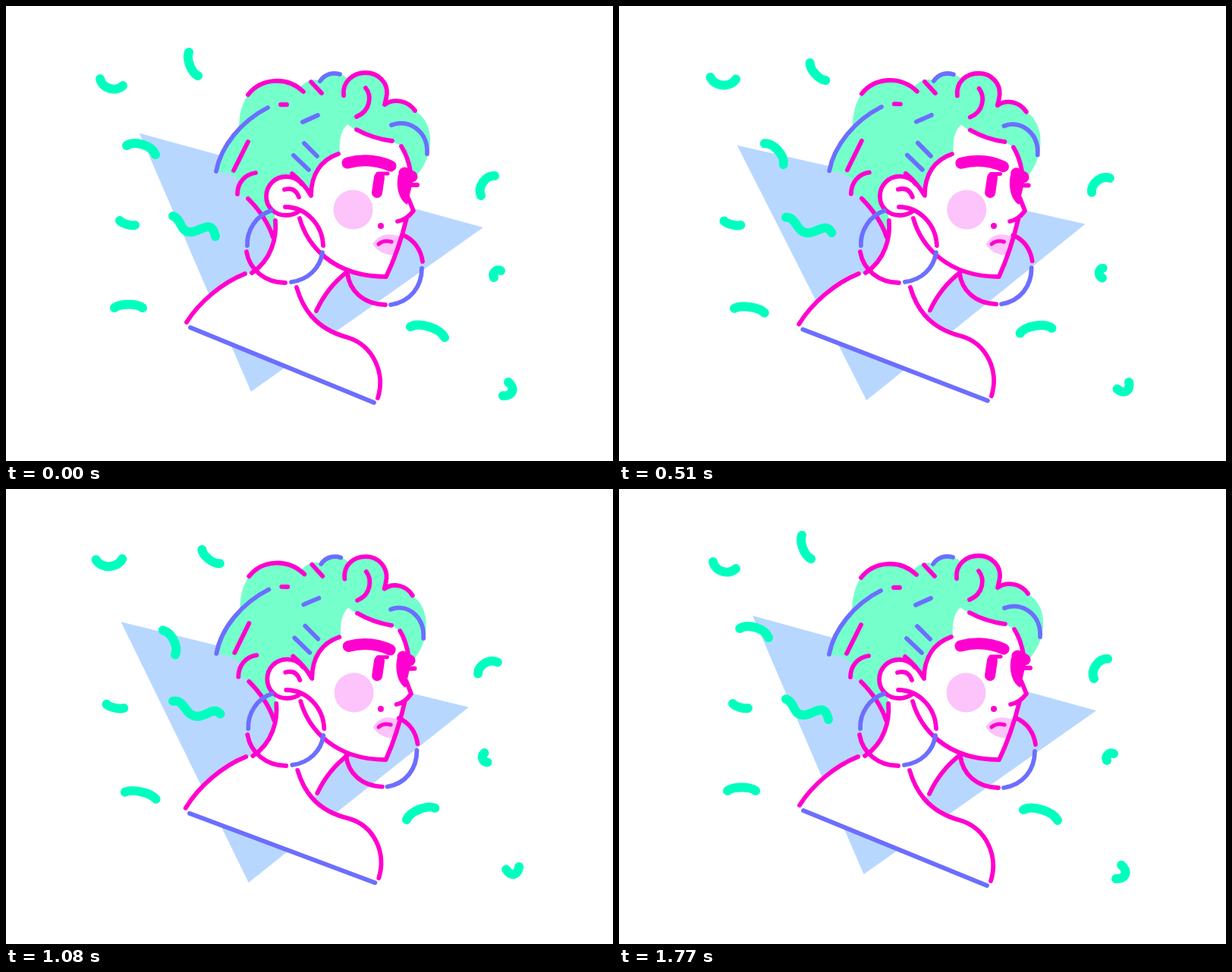
These frames come from a looping animation (800x600 px, 1.8 s). An HTML page with a canvas:

```html
<!DOCTYPE html>
<html lang="en">
<head>
<meta charset="utf-8">
<title>Portrait with confetti</title>
<style>
  html, body { margin: 0; width: 100%; height: 100%; overflow: hidden; background: #fff; }
  canvas { display: block; }
</style>
</head>
<body>
<canvas id="stage" width="800" height="600"></canvas>
<script>
const ctx = document.getElementById('stage').getContext('2d');
const LOOP = 1800, STEP = 30;
const PINK = '#ff00cf', BLUE = '#6c6eff', MINT = '#75ffcb',
      CONFETTI = '#00ffbf', SKY = '#b8d7ff', BLUSH = '#fcc4fa';

const clamp = (v, lo = 0, hi = 1) => Math.min(hi, Math.max(lo, v));
const mix = (a, b, p) => a + (b - a) * p;

// Confetti arcs: first chord, last chord, bend
const ARCS = [
  [124, 96, 154, 105, 118, 93, 153, 91, .55],
  [241, 61, 253, 92, 260, 81, 284, 98, .3],
  [159, 184, 197, 196, 210, 188, 224, 221, -.38],
  [150, 283, 170, 289, 131, 284, 154, 289, .2],
  [143, 398, 180, 398, 158, 400, 199, 410, -.24],
  [644, 224, 626, 250, 648, 229, 622, 243, .5],
  [652, 349, 643, 358, 629, 349, 634, 361, .7],
  [533, 423, 578, 437, 528, 437, 564, 420, -.31],
  [662, 496, 655, 514, 677, 499, 660, 501, -.95]
];
const SQUIGGLE = [
  [220, 277, 232, 281, 229, 299, 244, 298, 257, 297, 271, 280, 276, 304],
  [220, 280, 236, 276, 236, 300, 253, 300, 265, 300, 274, 287, 283, 296]
];

const BODY = `M238,417 C255,390 285,365 315,353 L324,352 C350,335 357,305 355,283
  L350,250 L402,200 L440,195 C439,180 440,165 450,156 L515,176 L521,185
  C528,196 531,206 533,218 L531,254 L537,270 L527,280 L501,357 L449,351
  C435,362 420,378 409,402 L402,408 C412,420 427,431 450,437
  C485,448 500,485 490,517 L485,523 L243,424 Z`;

const HAIR = `M277,218 C282,192 294,175 307,161 C307,143 311,128 319,117
  C336,95 370,92 388,107 C396,98 406,95 414,99 C420,90 430,87 440,90
  Q448,92 452,98 C458,91 465,88 474,88 C492,88 503,102 502,116 L499,130
  C512,121 530,125 539,138 C553,147 560,162 559,180 C558,198 551,212 541,224
  L533,218 C531,206 528,196 521,185 L509,178 Q472,174 450,156
  C440,165 439,180 440,195 C415,203 402,222 402,250 L385,232 L350,245
  L355,283 L352,305 Q343,278 319,254 L306,247 L307,231 Q299,221 288,220 Z`;

const HAIR_PINK = `M319,117 C336,95 370,92 392,113 M402,100 L416,115 M362,130 L370,130
  M445,118 C443,100 457,88 474,88 C492,88 503,102 502,116 Q501,123 499,130
  C512,121 530,125 539,138 M474,108 C482,118 481,138 462,146
  M462,163 Q484,175 509,178 M319,179 L300,217 M305,248 C305,233 315,222 329,220
  M438,195 C415,203 402,222 402,250 Q392,233 377,221 M319,254 Q343,278 352,305`;

const HAIR_BLUE = `M277,218 C283,185 310,152 345,134 M414,99 C420,90 430,87 440,90
  M508,157 C530,148 557,165 555,195 M391,153 L411,144
  M393,181 L410,198 M379,197 L399,216`;

const BODY_PINK = `M238,417 C255,390 285,365 315,353 M355,283 C357,305 350,335 324,352
  M383,371 C390,395 405,425 450,437 C485,448 500,485 490,517
  M449,351 C435,362 420,378 409,402
  M387,280 C397,315 430,357 501,357 C513,332 523,300 528,280
  M521,185 C528,196 531,206 533,218 M530,253 L537,270 Q528,282 516,284`;

const EAR = 'M390,235 C385,228 378,225 369,225 C354,225 343,237 343,251 C343,265 354,276 369,276 C376,276 382,274 387,270';
const EAR_INNER = 'M367,242 Q381,238 386,252';
const HOOP_PINK = 'M368,265 C395,265 417,288 418,316 M317,324 C321,348 342,365 368,365';
const HOOP_BLUE = 'M318,316 C317,296 330,276 349,270 M376,364 C398,361 414,346 417,325';
const FAR_HOOP_PINK = 'M523,302 C538,308 547,322 549,337 M500,394 C470,393 453,375 450,353';
const FAR_HOOP_BLUE = 'M548,346 C548,370 533,390 507,394';
const LIPS = 'M483,314 C491,302 502,298 519,304 L512,329 C499,328 490,324 483,314 Z';
const FAR_EYE = 'M517,222 C513,240 519,257 529,262 L536,232 Z';

// Slight turn of the head and sway of the shoulders
function turn(x, y, p) {
  const low = clamp((y - 360) / 60);
  const side = Math.max(0, x - 440) ** 2 * .0005 * (1 - low);
  const back = Math.max(0, 300 - x) * .045;
  const nod = clamp((x - 420) * .022, -2, 2.6) * clamp((260 - y) / 80);
  const sway = (364 - x) / 30 * low;
  return [x + p * (1.4 - side - back), y + p * (nod + sway)];
}

const swing = (x, y, p) => [x - p * (2 + (x - 450) * .051), y - p * clamp((y - 310) / 40, -.5, 1) * 1.5];

const bend = (d, p, warp = turn) => new Path2D(
  d.replace(/([\d.]+),([\d.]+)/g, (_, x, y) => warp(+x, +y, p).join(',')));

function fill(path, color) {
  ctx.fillStyle = color;
  ctx.fill(path);
}

function line(path, color, width = 5.8) {
  ctx.strokeStyle = color;
  ctx.lineWidth = width;
  ctx.stroke(path);
}

function dot(x, y, r, color, p) {
  const path = new Path2D();
  path.arc(...turn(x, y, p), r, 0, Math.PI * 2);
  fill(path, color);
}

// Turns and scales the chord about the fixed point of its two poses
function arc([x1, y1, x2, y2, u1, v1, u2, v2, k], p) {
  const dx = x2 - x1, dy = y2 - y1, ex = u2 - u1, ey = v2 - v1, n = dx * dx + dy * dy;
  const wr = (ex * dx + ey * dy) / n, wi = (ey * dx - ex * dy) / n;
  const ar = 1 - wr, ai = -wi, m = ar * ar + ai * ai;
  const br = u1 - (wr * x1 - wi * y1), bi = v1 - (wr * y1 + wi * x1);
  const cx = (br * ar + bi * ai) / m, cy = (bi * ar - br * ai) / m;
  const s = Math.hypot(wr, wi) ** p, a = Math.atan2(wi, wr) * p;
  const c = Math.cos(a) * s, d = Math.sin(a) * s;
  const at = (along, off) => {
    const x = x1 + dx * along - dy * off - cx, y = y1 + dy * along + dx * off - cy;
    return [cx + x * c - y * d, cy + x * d + y * c];
  };
  const path = new Path2D(), h = k * .667;
  path.moveTo(...at(0, 0));
  path.bezierCurveTo(...at(.2, h), ...at(.8, h), ...at(1, 0));
  line(path, CONFETTI, 12);
}

function squiggle(p) {
  const q = SQUIGGLE[0].map((v, i) => mix(v, SQUIGGLE[1][i], p));
  const path = new Path2D();
  path.moveTo(q[0], q[1]);
  path.bezierCurveTo(...q.slice(2, 8));
  path.bezierCurveTo(...q.slice(8));
  line(path, CONFETTI, 12);
}

function triangle(angle, ease) {
  const s = Math.sin(angle - 1.117), tilt = Math.sin(angle - .698), shift = 17.1 * ease;
  const path = new Path2D();
  path.moveTo(170 - 6.5 * s - shift, 174.5 + 10.5 * tilt);
  path.lineTo(626.5 - 2.7 * s - shift, 289.3 - 3.1 * s);
  path.lineTo(331 + 9 * s - shift, 515.3 + 7.7 * s);
  path.closePath();
  fill(path, SKY);
}

function portrait(p) {
  fill(bend(BODY, p), '#fff');
  fill(bend(HAIR, p), MINT);
  fill(bend(EAR, p), '#fff');
  dot(457.5, 268.5, 26, BLUSH, p);
  fill(bend(LIPS, p), BLUSH);

  line(bend(FAR_HOOP_PINK, p, swing), PINK);
  line(bend(FAR_HOOP_BLUE, p, swing), BLUE);
  line(bend(HAIR_BLUE, p), BLUE);
  line(bend(HAIR_PINK, p), PINK);
  line(bend(BODY_PINK, p), PINK);
  line(bend('M243,424 L485,523', p), BLUE);
  line(bend(EAR, p), PINK);
  line(bend(EAR_INNER, p), PINK);
  line(bend(HOOP_BLUE, p), BLUE);
  line(bend(HOOP_PINK, p), PINK);

  line(bend('M450,207 Q480,199 507,211', p), PINK, 15);
  line(bend('M492,226 L489,246', p), PINK, 14);
  line(bend('M490,221 L503,221', p), PINK, 5);
  line(bend('M525,220 L535,225', p), PINK, 15);
  fill(bend(FAR_EYE, p), PINK);
  line(bend('M533,236 L542,236', p), PINK, 6);
  line(bend('M491,314 Q498,308 508,311', p), PINK, 5);
  dot(494, 290, 4, PINK, p);
}

function draw(t) {
  const angle = t / LOOP * Math.PI * 2;
  const ease = (1 - Math.cos(angle)) / 2;
  const p = ease / .976;
  ctx.fillStyle = '#fff';
  ctx.fillRect(0, 0, 800, 600);
  ctx.lineCap = ctx.lineJoin = 'round';
  triangle(angle, ease);
  ARCS.forEach(a => arc(a, p));
  squiggle(p);
  portrait(p);
}

const start = performance.now();
function tick() {
  const t = (performance.now() - start) % LOOP;
  draw(Math.floor(t / STEP) * STEP);
  requestAnimationFrame(tick);
}
tick();
</script>
</body>
</html>
```
